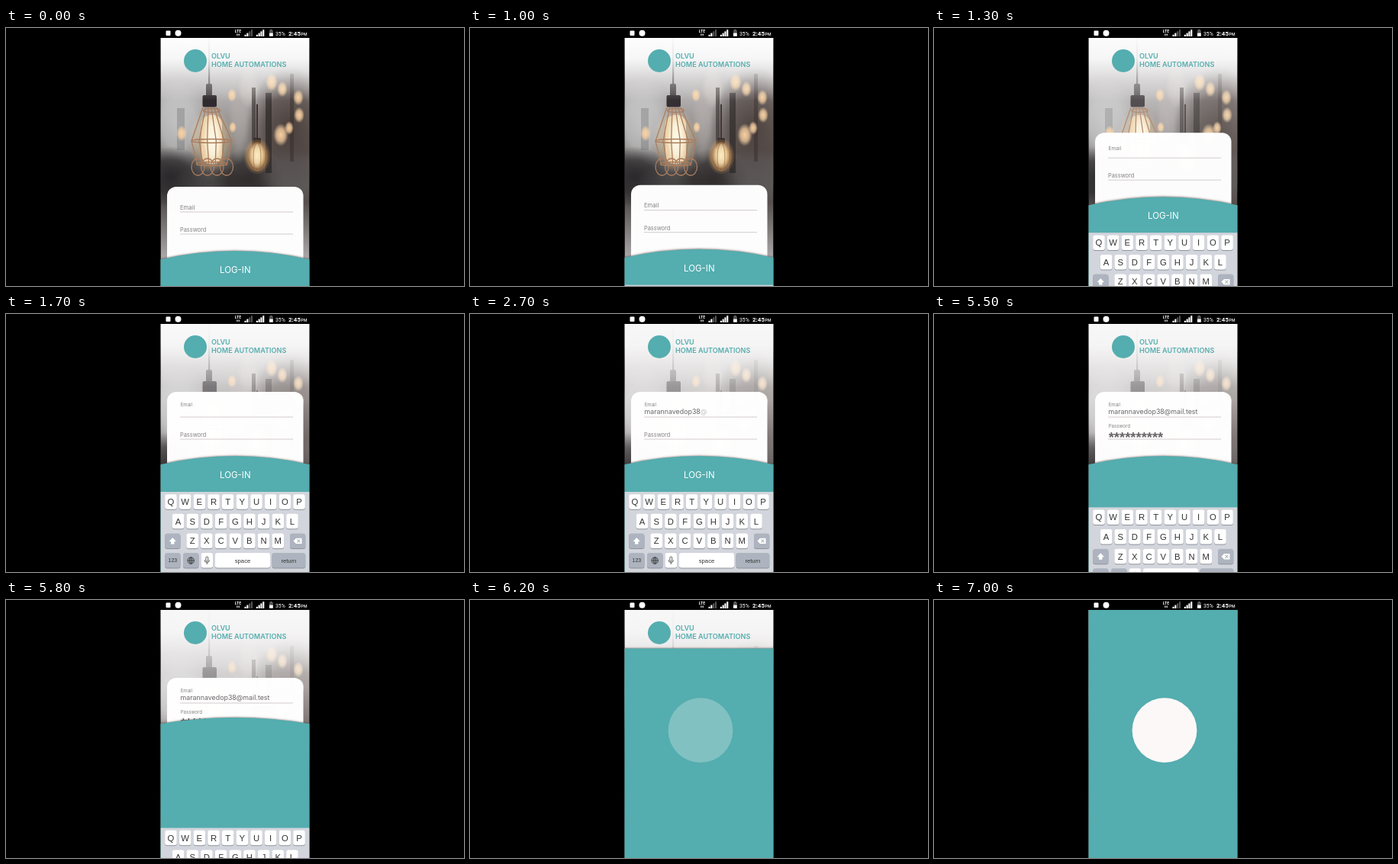
An HTML page with a canvas for the animation above (10000 ms loop, 600x338 px).

```html
<!DOCTYPE html>
<html lang="en">
<head>
<meta charset="utf-8">
<title>Log-in animation</title>
<style>
html, body { margin: 0; width: 100%; height: 100%; overflow: hidden; background: #000; }
canvas { display: block; }
</style>
</head>
<body>
<canvas id="stage" width="600" height="338"></canvas>
<script>
const c = document.getElementById('stage').getContext('2d');
const TEAL = '#54adaf', LEFT = 202.5, RIGHT = 397.5, BOTTOM = 338, LOOP = 10000;
const SANS = 'Inter, sans-serif', KEYS = '"Liberation Sans", sans-serif';
const EMAIL = 'marannavedop38@mail.test';

const ramp = (t, from, to) => Math.min(1, Math.max(0, (t - from) / (to - from)));
const ease = (t, from, to) => { const u = ramp(t, from, to); return u * u * (3 - 2 * u); };
const mix = (a, b, u) => a + (b - a) * u;

function rect(x, y, w, h, color) {
  c.fillStyle = color;
  c.fillRect(x, y, w, h);
}

function round(x, y, w, h, r, color) {
  c.fillStyle = color;
  c.beginPath();
  c.roundRect(x, y, w, h, r);
  c.fill();
}

function disc(x, y, r, color) {
  c.fillStyle = color;
  c.beginPath();
  c.arc(x, y, r, 0, 7);
  c.fill();
}

function text(s, x, y, size, color, { weight = 400, font = SANS, align = 'left' } = {}) {
  c.font = `${weight} ${size}px ${font}`;
  c.fillStyle = color;
  c.textAlign = align;
  c.fillText(s, x, y);
}

function path(color, width, ...points) {
  c.strokeStyle = color;
  c.lineWidth = width;
  c.beginPath();
  points.forEach(([x, y]) => c.lineTo(x, y));
  c.stroke();
}

function fade(y0, y1, ...stops) {
  const g = c.createLinearGradient(0, y0, 0, y1);
  stops.forEach((s, i) => g.addColorStop(i / (stops.length - 1), s));
  rect(LEFT, 13, RIGHT - LEFT, BOTTOM - 13, g);
}

// Soft elliptical spot of light or shade; color is "r,g,b"
function glow(x, y, rx, ry, color, alpha) {
  c.save();
  c.translate(x, y);
  c.scale(rx, ry);
  const g = c.createRadialGradient(0, 0, 0, 0, 0, 1);
  g.addColorStop(0, `rgba(${color},${alpha})`);
  g.addColorStop(0.55, `rgba(${color},${alpha * 0.75})`);
  g.addColorStop(1, `rgba(${color},0)`);
  disc(0, 0, 1, g);
  c.restore();
}

function lamp() {
  rect(265, 13, 2.2, 62, '#5b5656');
  round(262, 73, 8, 16, 2, '#474143');
  round(257.5, 88, 18.5, 15.5, 2, '#2f2a2e');
  glow(269, 147, 30, 42, '255,214,150', 0.5);
  round(256, 114, 27, 64, 12, 'rgba(255,226,180,.75)');
  glow(271, 146, 13, 36, '255,252,235', 0.95);
  c.strokeStyle = '#a97c5c';
  c.lineWidth = 1.3;
  for (const k of [-1, -0.62, -0.22, 0.22, 0.62, 1]) {
    c.beginPath();
    c.moveTo(267 + k * 9, 104);
    c.lineTo(269.5 + k * 26.5, 148);
    c.lineTo(270 + k * 19, 180);
    c.stroke();
  }
  for (const [y, rx] of [[108, 11], [148, 26.5], [178, 20]]) {
    c.beginPath();
    c.ellipse(269.5, y, rx, 2.5, 0, 0, 7);
    c.stroke();
  }
  for (let i = 0; i < 4; i++) {
    c.beginPath();
    c.ellipse(251.5 + i * 12.5, 182, 8.5, 11, 0, 0, 7);
    c.stroke();
  }
}

function photo(veil) {
  fade(13, 300, '#d0cfd0', '#b5b2b2', '#7d7977', '#55504f', '#aaa6a7');
  glow(226, 125, 40, 60, '205,206,207', 0.8);
  glow(216, 195, 48, 40, '38,37,39', 0.95);
  glow(268, 202, 48, 24, '62,60,61', 0.8);
  glow(372, 130, 58, 80, '62,50,46', 0.85);
  glow(318, 198, 48, 40, '42,38,39', 0.9);
  glow(372, 192, 42, 34, '88,84,84', 0.85);
  glow(305, 118, 14, 60, '185,178,175', 0.55);
  glow(318, 78, 15, 28, '215,208,203', 0.6);
  rect(322, 78, 5, 80, 'rgba(48,42,42,.6)');
  rect(340, 85, 8, 105, 'rgba(36,32,33,.6)');
  rect(372, 60, 5, 115, 'rgba(45,36,34,.4)');
  rect(224, 105, 10, 55, 'rgba(95,92,92,.3)');
  for (const [x, y, r] of [[348, 71, 8], [362, 80, 7], [383, 91, 7], [384, 114, 7],
    [371, 131, 6], [360, 140, 10], [296, 88, 6], [297, 130, 5], [230, 138, 7]])
    glow(x, y, r, r * 1.5, '255,214,165', 0.95);
  rect(328, 100, 2, 48, '#3c3231');
  round(324, 144, 10, 8, 2, '#302828');
  glow(329, 168, 18, 24, '255,180,92', 0.75);
  glow(329, 167, 11, 18, '255,240,200', 0.95);
  c.strokeStyle = '#a87850';
  c.lineWidth = 0.8;
  for (const rx of [5, 13]) {
    c.beginPath();
    c.ellipse(329, 169, rx, 18, 0, 0, 7);
    c.stroke();
  }
  lamp();
  fade(13, 95, 'rgba(255,255,255,.97)', 'rgba(255,255,255,.85)', 'rgba(255,255,255,.35)', 'rgba(255,255,255,0)');
  c.globalAlpha = veil;
  fade(13, 215, 'rgba(245,244,244,.7)', 'rgba(245,243,243,.5)', 'rgba(245,243,243,0)');
  c.globalAlpha = 1;
}

function header() {
  disc(248, 43, 15, TEAL);
  text('OLVU', 269, 40, 9.1, TEAL, { weight: 600 });
  text('HOME AUTOMATIONS', 269, 50.5, 9.1, TEAL, { weight: 600 });
}

function label(s, y, lift, size) {
  text(s, mix(228, 228.7, lift), y, mix(size, 6.1, lift), '#858083');
}

// Types n characters, the last one partly faded in
function typed(s, n, x, y, size, style) {
  const whole = Math.floor(n);
  text(s.slice(0, whole), x, y, size, '#686567', style);
  const end = x + c.measureText(s.slice(0, whole)).width;
  c.globalAlpha = n - whole;
  text(s.slice(whole, whole + 1), end, y, size, '#686567', style);
  c.globalAlpha = 1;
}

function card(t, y, lift) {
  round(211, y, 178.5, 180, 12, 'rgba(255,255,255,.985)');
  const focus = ease(t, 3150, 3700);
  label('Email', y + mix(29.8, 19, lift), lift, 7.7);
  label('Password', y + mix(59, 46.7, focus), focus, 7.4);
  rect(228, y + 32.5, 148, 1, '#d3cccf');
  rect(228, y + 61.5, 148, 1, '#d3cccf');
  typed(EMAIL, EMAIL.length * ramp(t, 2100, 3100), 228.5, y + 29, 8.85);
  typed('*'.repeat(10), 10 * ramp(t, 4000, 5000) ** 1.44, 228.7, y + 66, 18.4, { font: KEYS, weight: 700 });
}

function wave(top, bend) {
  c.beginPath();
  c.moveTo(LEFT - 2, BOTTOM + 10);
  c.lineTo(LEFT - 2, top + bend);
  c.quadraticCurveTo(300, top - bend, RIGHT + 2, top + bend);
  c.lineTo(RIGHT + 2, BOTTOM + 10);
  c.closePath();
  c.save();
  c.shadowColor = 'rgba(75,50,45,.6)';
  c.shadowBlur = 2.5;
  c.shadowOffsetY = -0.6;
  c.fillStyle = TEAL;
  c.fill();
  c.restore();
}

function key(x, y, w, s, size, gray) {
  round(x, y + 1, w, 19.5, 3, '#8f949c');
  round(x, y, w, 19.5, 3, gray ? '#adb4bf' : '#fff');
  if (s) text(s, x + w / 2, y + 9.8 + size * 0.36, size, '#333', { font: KEYS, align: 'center' });
}

function keyboard(y) {
  rect(LEFT, y, RIGHT - LEFT, 110, '#d2d5dc');
  [['QWERTYUIOP', 208.2], ['ASDFGHJKL', 217.8], ['ZXCVBNM', 236.4]].forEach(([row, x], r) =>
    [...row].forEach((ch, i) => key(x + i * 18.67, y + 3.2 + r * 25.6, 15.6, ch, 11.3)));
  const y3 = y + 54.4, y4 = y + 80;
  key(208.2, y3, 20.3, '', 0, true);
  key(372, y3, 20.3, '', 0, true);
  key(208.2, y4, 20.3, '123', 7, true);
  key(232, y4, 20.5, '', 0, true);
  key(255.5, y4, 15.6, '', 0);
  key(274, y4, 72, 'space', 7.7);
  key(348.5, y4, 43.8, 'return', 7.5, true);

  // shift
  c.fillStyle = '#fff';
  c.beginPath();
  for (const [x, dy] of [[218.3, 5.5], [223, 10.5], [220.5, 10.5], [220.5, 14], [216.1, 14], [216.1, 10.5], [213.6, 10.5]])
    c.lineTo(x, y3 + dy);
  c.fill();
  // backspace
  c.beginPath();
  for (const [x, dy] of [[376.5, 10], [380, 6.3], [387.5, 6.3], [387.5, 13.7], [380, 13.7]])
    c.lineTo(x, y3 + dy);
  c.fill();
  path('#8f96a1', 1, [381.5, y3 + 8], [385.3, y3 + 12]);
  path('#8f96a1', 1, [385.3, y3 + 8], [381.5, y3 + 12]);
  // globe
  c.strokeStyle = '#333';
  c.lineWidth = 0.8;
  for (const rx of [4.3, 2]) {
    c.beginPath();
    c.ellipse(242.2, y4 + 10, rx, 4.3, 0, 0, 7);
    c.stroke();
  }
  path('#333', 0.8, [238, y4 + 10], [246.5, y4 + 10]);
  path('#333', 0.8, [242.2, y4 + 5.7], [242.2, y4 + 14.3]);
  // microphone
  c.beginPath();
  c.roundRect(261.9, y4 + 5, 2.8, 6, 1.4);
  c.stroke();
  c.beginPath();
  c.arc(263.3, y4 + 9.3, 3.2, 0, Math.PI);
  c.stroke();
  path('#333', 0.8, [263.3, y4 + 12.5], [263.3, y4 + 15]);
}

function signal(x, lit) {
  for (let i = 0; i < 4; i++)
    rect(x + i * 2.8, 8.8 - i * 2.2, 2.1, 2.2 + i * 2.2, i < lit ? '#fff' : '#555');
}

function statusBar() {
  const roboto = 'Roboto, sans-serif';
  round(209.5, 3.5, 6, 6.5, 1, '#fff');
  disc(225.5, 6.7, 4, '#fff');
  text('LTE', 304, 6, 5, '#fff', { weight: 700, align: 'center' });
  rect(302.2, 7.5, 1.3, 2.5, '#ddd');
  rect(304.6, 7.5, 1.3, 2.5, '#ddd');
  signal(312.5, 2);
  signal(327.8, 4);
  rect(346.2, 2, 2.4, 1.2, '#777');
  rect(345, 3, 4.8, 3.5, '#555');
  rect(345, 6.5, 4.8, 4.3, '#fff');
  text('35%', 353, 9.7, 6.9, '#fff', { font: roboto });
  text('2:45', 370, 9.9, 8, '#fff', { weight: 700, font: roboto });
  text('PM', 386.6, 9.9, 5.2, '#fff', { weight: 500, font: roboto });
}

function draw(t) {
  const lift = ease(t, 950, 1520);
  const hide = ease(t, 5220, 6220);
  const rise = ease(t, 5500, 6600);
  const cardY = mix(208, 102, lift);

  rect(0, 0, 600, 338, '#000');
  c.save();
  c.beginPath();
  c.rect(LEFT, 13, RIGHT - LEFT, BOTTOM - 13);
  c.clip();
  photo(ramp(t, 950, 2000));
  header();
  card(t, cardY, lift);
  wave(mix(cardY + 84, 11, rise), 11.5 * (1 - ramp(rise, 0, 0.7)));

  c.globalAlpha = 1 - ramp(t, 5150, 5450);
  text('LOG-IN', 300.3, cardY + 113.3, 11.5, '#fff', { align: 'center' });
  c.globalAlpha = ramp(t, 5950, 6900);
  disc(302, 170.7, 42.4, '#fdf8f8');
  c.globalAlpha = 1;

  keyboard(mix(339, 233, lift - hide));
  c.restore();
  statusBar();
}

const start = performance.now();
function tick() {
  // the picture advances ten times a second
  draw(Math.floor(((performance.now() - start) % LOOP) / 100) * 100);
  requestAnimationFrame(tick);
}
tick();
</script>
</body>
</html>
```
